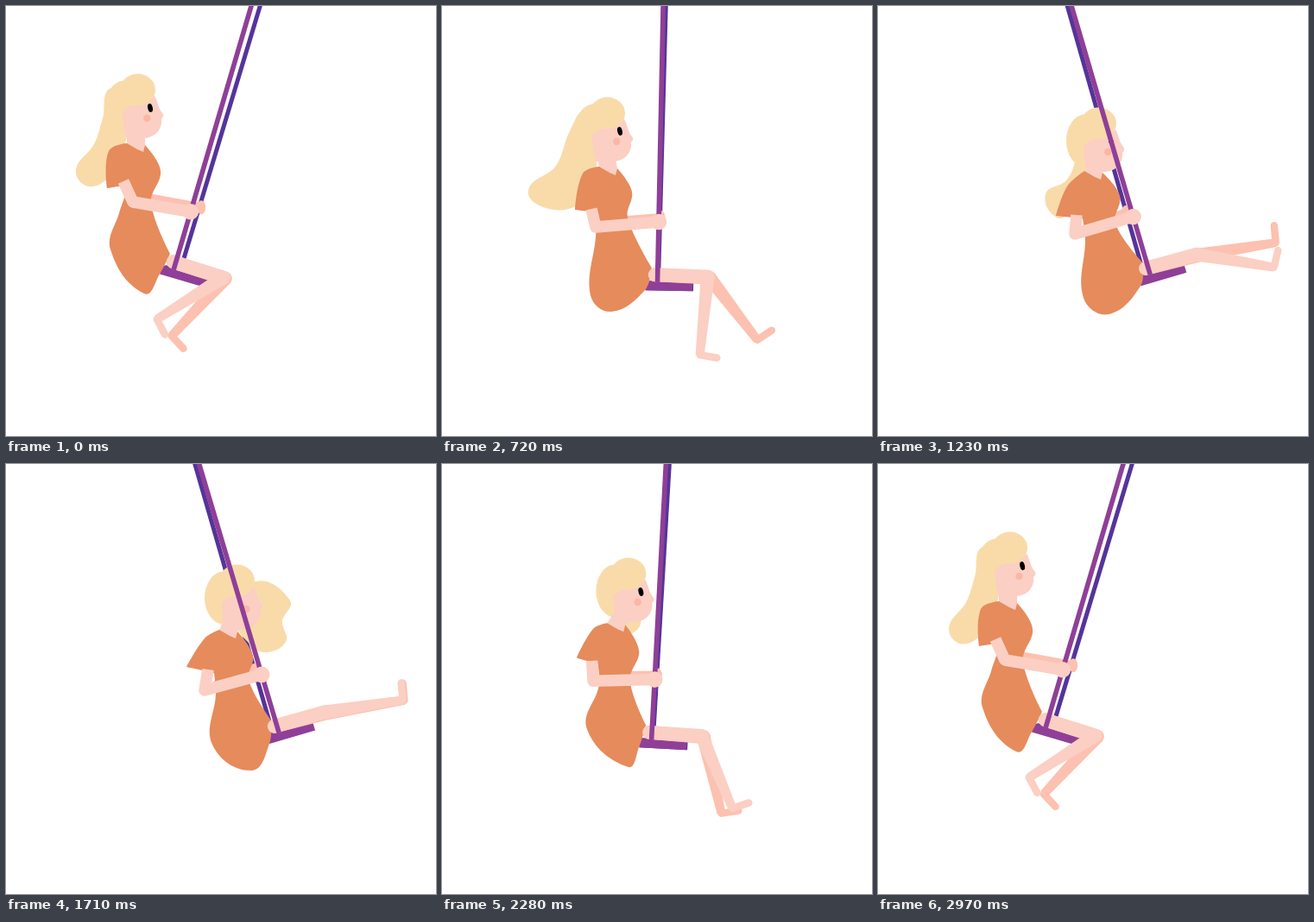
An HTML page that plays this animation: 498x498 px, repeating every 3 s.

```html
<!DOCTYPE html>
<html lang="en">
<head>
<meta charset="utf-8">
<title>Girl on a swing</title>
<style>
html, body { margin: 0; width: 100%; height: 100%; overflow: hidden; background: #fff; }
svg { display: block; width: 100vw; height: 100vh; }
path { fill: none; }
</style>
</head>
<body>
<svg id="stage" viewBox="0 0 498 498"></svg>
<script>
const LOOP = 3000, STEP = 30, HALF = 1485;
const PIVOT = [254, 102];
const KEY_TIMES = [0, 720, 1230, 1710, 2070, 2490, 3000];
const COLORS = {
  skin: '#fbcfc3', farSkin: '#fcc1b0', cheek: '#fcb6a6', hair: '#f9dbaa',
  dress: '#e68b5c', rope: '#8f3f97', farRope: '#55349a'
};

// Swing angle in degrees, eased between the two extremes.
function swing(t) {
  const u = (t % LOOP) / HALF;
  const x = Math.max(0, u > 1 ? 2 - u : u);
  const eased = x < .5 ? 4 * x ** 3 : 1 - 4 * (1 - x) ** 3;
  return 16.4 - 33.4 * eased;
}

function rotate([x, y], degrees) {
  const a = degrees * Math.PI / 180, c = Math.cos(a), s = Math.sin(a);
  return [x * c - y * s, x * s + y * c];
}
const add = (p, q) => [p[0] + q[0], p[1] + q[1]];
const polar = (p, length, degrees) => add(p, rotate([length, 0], degrees));
const toWorld = (p, angle) => add(PIVOT, rotate(p, angle));
const toLocal = (p, angle) => rotate([p[0] - PIVOT[0], p[1] - PIVOT[1]], -angle);

// Periodic monotone cubic interpolation of one value per key time.
function curve(values) {
  const n = values.length;
  const gap = i => KEY_TIMES[i + 1] - KEY_TIMES[i];
  const rise = values.map((v, i) => (values[(i + 1) % n] - v) / gap(i));
  const slope = values.map((_, i) => {
    const a = rise[(i + n - 1) % n], b = rise[i];
    return a * b <= 0 ? 0 : 2 * a * b / (a + b);
  });
  return t => {
    let i = n - 1;
    while (KEY_TIMES[i] > t) i--;
    const j = (i + 1) % n, h = gap(i), u = (t - KEY_TIMES[i]) / h, w = 1 - u;
    return values[i] * (1 + 2 * u) * w * w + values[j] * u * u * (3 - 2 * u)
      + h * u * w * (slope[i] * w - slope[j] * u);
  };
}

// A point that is interpolated in the frame of the swing.
function track(...keys) {
  const local = keys.map((p, i) => toLocal(p, swing(KEY_TIMES[i])));
  const x = curve(local.map(p => p[0])), y = curve(local.map(p => p[1]));
  return t => toWorld([x(t), y(t)], swing(t));
}

const head = track([0, 0], [39, 27], [103, 39], [115, 38], [97, 39], [27, 14]);
const elbow = track([147, 227], [178, 256], [228, 264], [230, 262], [209, 262], [151, 238]);

const neck = track([161, 161], [203, 188], [260, 193], [268, 194], [248, 194], [182, 172]);
const shoulder = track([119, 168], [163, 194], [219, 209], [230, 202], [211, 199], [143, 178]);
const sleeveTip = track([117, 211], [154, 236], [206, 243], [209, 235], [190, 233], [129, 214]);
const sleeveEnd = track([143, 207], [180, 239], [237, 246], [241, 242], [217, 241], [154, 219]);
const back = track([131, 240], [178, 268], [240, 270], [243, 266], [221, 260], [148, 250]);
const rump = track([121, 282], [172, 335], [238, 338], [239, 325], [212, 318], [136, 292]);
const hem = track([160, 333], [196, 354], [267, 357], [284, 355], [264, 356], [179, 340]);
const waist = track([168, 228], [215, 245], [275, 252], [281, 250], [257, 250], [185, 245]);
const chest = track([179, 191], [220, 215], [280, 220], [286, 222], [265, 222], [198, 204]);

const tail = [
  track([122, 95], [168, 120], [225, 140], [250, 178], [240, 178], [152, 138]),
  track([112, 130], [148, 145], [228, 178], [262, 185], [246, 188], [150, 146]),
  track([102, 160], [132, 185], [218, 202], [277, 203], [257, 206], [154, 152]),
  track([81, 190], [100, 214], [194, 218], [298, 218], [274, 222], [161, 156]),
  track([96, 209], [124, 235], [207, 245], [324, 206], [293, 209], [170, 155]),
  track([122, 195], [160, 228], [225, 235], [320, 182], [290, 185], [180, 150]),
  track([138, 160], [178, 190], [240, 200], [329, 158], [299, 162], [188, 138]),
  track([140, 120], [178, 145], [245, 150], [289, 136], [272, 140], [183, 118])
];
const shin = curve([148, 95.7, 9.4, -8.8, 21.8, 111]);
const farShin = curve([133, 52.4, -9.2, -9.2, 36.5, 109.5]);

const fmt = p => p.map(v => v.toFixed(2)).join(' ');
const line = (...points) => 'M' + points.map(fmt).join('L');

// Closed smooth outline; the listed indices stay sharp.
function outline(points, corners = []) {
  const n = points.length, at = i => points[(i + n) % n];
  const handle = (i, sign) => {
    const p = at(i), a = at(i - 1), b = at(i + 1);
    if (corners.includes((i + n) % n)) return p;
    const q = at(i + sign);
    const reach = .36 * Math.hypot(q[0] - p[0], q[1] - p[1]);
    const span = Math.hypot(b[0] - a[0], b[1] - a[1]) || 1;
    return add(p, [sign * reach * (b[0] - a[0]) / span, sign * reach * (b[1] - a[1]) / span]);
  };
  return 'M' + fmt(points[0]) + points.map((_, i) =>
    'C' + [handle(i, 1), handle(i + 1, -1), at(i + 1)].map(fmt).join(' ')).join('') + 'Z';
}

function taper(a, b, ra, rb) {
  const angle = Math.atan2(b[1] - a[1], b[0] - a[0]) * 180 / Math.PI;
  return line(polar(a, ra, angle - 90), polar(b, rb, angle - 90),
    polar(b, rb, angle + 90), polar(a, ra, angle + 90)) + 'Z';
}

const svg = document.getElementById('stage');
function make(tag, attrs, parent = svg) {
  const node = document.createElementNS('http://www.w3.org/2000/svg', tag);
  for (const key in attrs) node.setAttribute(key, attrs[key]);
  return parent.appendChild(node);
}
const fill = color => make('path', { style: 'fill:' + color });
const stroke = (color, width, cap = 'butt') => make('path', {
  stroke: color, 'stroke-width': width, 'stroke-linecap': cap, 'stroke-linejoin': 'round'
});
const draw = (node, d) => node.setAttribute('d', d);

function makeLeg(color) {
  return { thigh: stroke(color, 16, 'round'), shin: fill(color), foot: stroke(color, 8.5, 'round') };
}
function drawLeg(leg, hip, knee, angle) {
  const ankle = polar(knee, 91, angle);
  draw(leg.thigh, line(hip, knee));
  draw(leg.shin, taper(knee, ankle, 8, 5));
  draw(leg.foot, line(ankle, polar(ankle, 20, angle - 86)));
}

// Parts from back to front.
const farRope = stroke(COLORS.farRope, 5);
const farSeat = stroke(COLORS.farRope, 11);
const farArm = stroke(COLORS.farSkin, 10);
const farHand = make('ellipse', { rx: 5, ry: 8, fill: COLORS.farSkin });
const tailShape = fill(COLORS.hair);
const cap = make('ellipse', { cx: 137, cy: 117, rx: 22, ry: 30.5, fill: COLORS.hair });
const seat = stroke(COLORS.rope, 11);
const farLeg = makeLeg(COLORS.farSkin);
const dress = fill(COLORS.dress);
const neckShape = fill(COLORS.skin);
const face = make('g', {});
make('path', {
  style: 'fill:' + COLORS.skin,
  d: 'M135 124C142 112 160 113 172 104C176 111 176 118 181 124Q184 127 180 131C181 142 174 152 160 153L140 153Q135 140 135 124Z'
}, face);
make('circle', { cx: 163.3, cy: 130, r: 4.2, fill: COLORS.cheek }, face);
const eye = make('ellipse', { cx: 167, cy: 118, rx: 2.8, ry: 5, transform: 'rotate(-14 167 118)' }, face);
make('ellipse', { cx: 152.5, cy: 97, rx: 20.5, ry: 18.5, fill: COLORS.hair }, face);
const nearLeg = makeLeg(COLORS.skin);
const rope = stroke(COLORS.rope, 5.6);
const arm = stroke(COLORS.skin, 13.5);
const hand = make('circle', { r: 9.3, fill: COLORS.skin });

function render(t) {
  const angle = swing(t);
  const lift = 6 * (Math.max(0, angle) / 16.4) ** 2;
  const gap = 1.2 + .46 * angle;
  const place = (x, y) => toWorld([x, y - lift], angle);

  draw(rope, line(place(0, -160), place(0, 218)));
  const farEnd = (y) => add(toWorld([0, y], angle + .4), [gap + .7, 0]);
  draw(farRope, line(farEnd(-160), farEnd(210)));
  draw(seat, line(place(-14, 222), place(41, 222)));
  draw(farSeat, line(...[place(-14, 222), place(41, 222)].map(p => add(p, [gap * .4, 0]))));

  const hip = place(-3, 209.5), knee = place(58, 210.5);
  drawLeg(farLeg, hip, add(knee, [2, 1]), farShin(t));
  drawLeg(nearLeg, hip, knee, shin(t));

  const collar = neck(t), collarBack = add(collar, [-21, -2]);
  const hipRoot = place(-7, 209);
  const cuff = sleeveEnd(t);
  draw(dress, outline([
    collarBack, shoulder(t), sleeveTip(t), cuff, back(t), rump(t), hem(t),
    add(hipRoot, rotate([-7, 18], angle)), add(hipRoot, [0, -8]), waist(t), chest(t), collar
  ], [0, 2, 3, 8, 11]));

  const shift = head(t);
  draw(neckShape, line(add(shift, [139, 138]), add(shift, [161, 146]),
    collar, add(collar, [-2, 8]), add(collar, [-9, 5]), collarBack) + 'Z');
  for (const node of [cap, face]) node.setAttribute('transform', `translate(${fmt(shift)})`);
  const closing = Math.min(1, Math.max(0, (t - 1200) / 60), Math.max(0, (1980 - t) / 60));
  eye.setAttribute('ry', 5 * (1 - closing));
  draw(tailShape, outline(tail.map(point => point(t))));

  const bend = elbow(t), grip = place(0, 148);
  draw(arm, line(add(cuff, [-7, -4]), bend, grip));
  hand.setAttribute('cx', grip[0]);
  hand.setAttribute('cy', grip[1]);
  const farGrip = add(grip, [gap * 1.4, -5]);
  draw(farArm, line(add(bend, [12, -6]), farGrip));
  farHand.setAttribute('cx', farGrip[0]);
  farHand.setAttribute('cy', farGrip[1]);
}

const start = performance.now();
function tick() {
  const elapsed = Math.max(0, performance.now() - start) % LOOP;
  render(Math.floor(elapsed / STEP) * STEP);
  requestAnimationFrame(tick);
}
tick();
</script>
</body>
</html>
```
